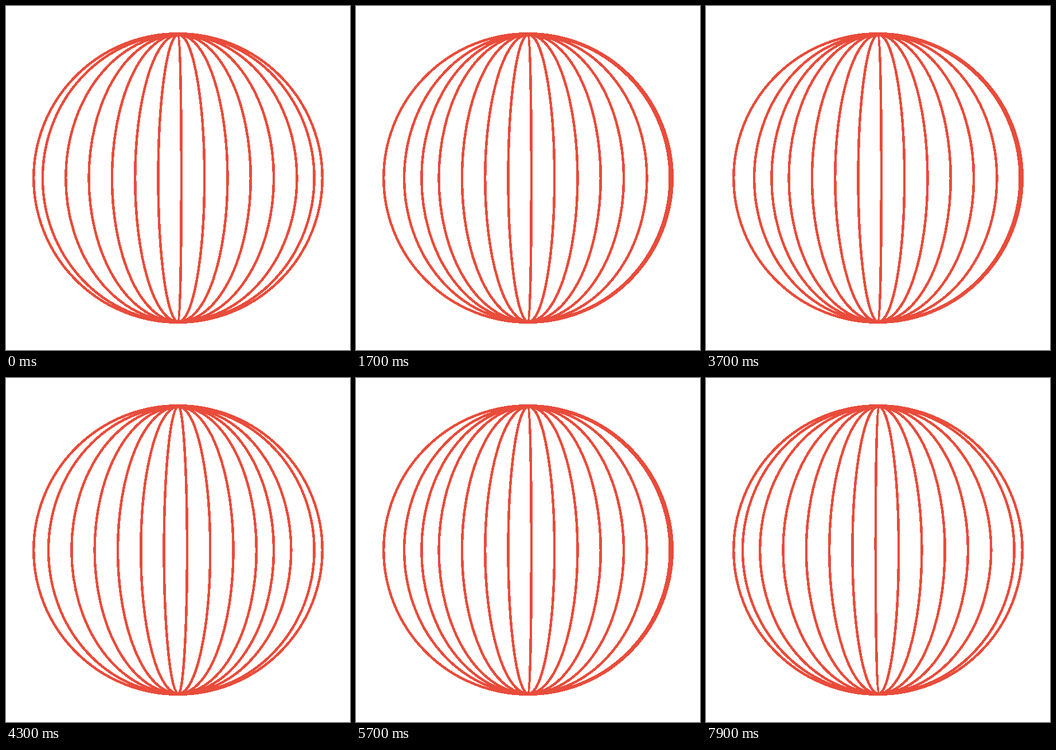
Recreate the animation shown at these times as an HTML page. Size 600 px wide and 600 px high, loop 8000 ms.

```html
<!DOCTYPE html>
<html lang="en">
<head>
<meta charset="utf-8">
<title>Turning globe</title>
<style>
  html, body { margin: 0; width: 100%; height: 100%; overflow: hidden; background: #fff; }
  svg { display: block; width: 100%; height: 100%; }
  #globe { fill: none; stroke: #e94c3b; stroke-width: 4.5; shape-rendering: crispEdges; }
</style>
</head>
<body>
<svg viewBox="0 0 600 600">
  <g id="globe">
    <circle cx="300" cy="300" r="251.8"/>
  </g>
</svg>
<script>
const CX = 300.8, CY = 300.2;  // centre of the meridians
const RX = 252, RY = 250.4;
const SLOTS = 50;      // positions across the disc
const TICK = 100;      // ms between redraws
const SLOT_TIME = 40;  // ms a meridian spends in one slot
const LOOP = 8000;

const globe = document.getElementById('globe');

function addPath() {
  return globe.appendChild(document.createElementNS('http://www.w3.org/2000/svg', 'path'));
}

// Twelve meridians four slots apart, the last one closes the ring.
const starts = Array.from({ length: 12 }, (_, i) => 1 + 4 * i).concat(48);
const lines = starts.map(start => ({ start, path: addPath() }));

function meridian(slot) {
  const rx = RX * ((slot + 0.5) / SLOTS * 2 - 1);
  return `M${CX} ${CY - RY}A${Math.abs(rx)} ${RY} 0 0 ${rx > 0 ? 1 : 0} ${CX} ${CY + RY}`;
}

function draw(time) {
  const tick = Math.floor((time % LOOP) / TICK) * TICK;
  const shift = Math.floor(tick / SLOT_TIME) % SLOTS;
  for (const { start, path } of lines) {
    path.setAttribute('d', meridian((start - shift + SLOTS) % SLOTS));
  }
}

const begin = performance.now();
function loop() {
  draw(performance.now() - begin);
  requestAnimationFrame(loop);
}
loop();
</script>
</body>
</html>
```
